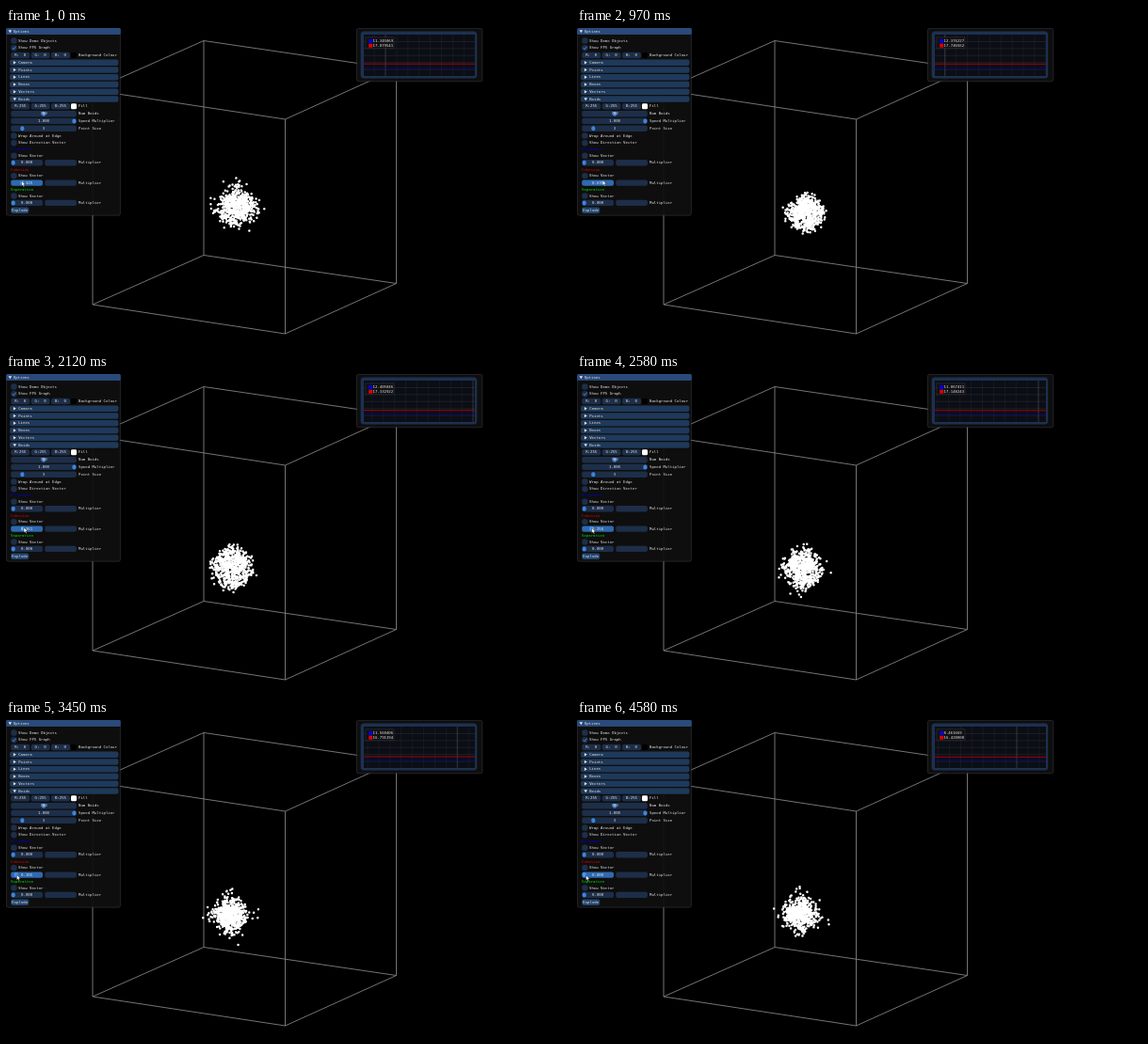
Animation of 600x338 px, one loop 4610 ms. Source, as an HTML page with a canvas:

```html
<!DOCTYPE html>
<html lang="en">
<head>
<meta charset="utf-8">
<title>Boids</title>
<style>
  html, body { margin: 0; width: 100%; height: 100%; overflow: hidden; background: #000; }
  canvas { display: block; width: 600px; height: 338px; }
</style>
</head>
<body>
<canvas id="stage" width="600" height="338"></canvas>
<script>
const ctx = document.getElementById('stage').getContext('2d');
const LOOP = 4610;
const BOIDS = 640;

const C = {
  win: 'rgba(15,15,15,.94)', border: 'rgba(110,110,128,.4)', title: '#294a7a',
  frame: '#1d2e49', header: '#1f395a', button: '#23456d', active: '#2f6ab0',
  grab: '#3d85e0', grabOn: '#4296fa', text: '#e6e6e6', edge: '#828282'
};

// Keyed values, one entry per time in `times`.
const times = [0, 550, 1360, 2120, 2970, 3910, 4580];
const keys = {
  cx:     [245, 242.5, 243, 240.5, 239, 237, 237],
  cy:     [190.5, 193.5, 201, 206.5, 208, 207, 206.5],
  spread: [9, 6.5, 9.2, 8.8, 8.7, 7.8, 8.3],
  flat:   [.2, .2, .85, .6, .15, 0, 0],
  mx:     [16.5, 25.5, 26.5, 19, 13.5, 10, 9.5],
  my:     [162.5, 161.5, 162, 163, 164, 165, 165],
  value:  [.324, .62, .65, .361, .188, .04, 0],
  low:    [11.343063, 12.444778, 12.19556, 12.406331, 11.418835, 11.40524, 8.461669],
  high:   [17.879662, 17.813324, 17.656666, 17.333334, 16.993334, 16.610001, 16.42],
  tick:   [403, 396, 386, 377, 366, 355, 348]
};

// Smooth curve through the keyed values.
function at(name, t) {
  const v = keys[name], last = times.length - 1;
  if (t >= times[last]) return v[last];
  let i = 0;
  while (t >= times[i + 1]) i++;
  const slope = k => {
    const a = Math.max(k - 1, 0), b = Math.min(k + 1, last);
    return (v[b] - v[a]) / (times[b] - times[a]);
  };
  const d = times[i + 1] - times[i], s = (t - times[i]) / d, r = 1 - s;
  return v[i] * (1 + 2 * s) * r * r + slope(i) * d * s * r * r +
         v[i + 1] * s * s * (3 - 2 * s) - slope(i + 1) * d * s * s * r;
}

function seeded(seed) {
  return () => (seed = seed * 16807 % 2147483647) / 2147483647;
}

const rand = seeded(4271);
const boids = Array.from({ length: BOIDS }, (_, i) => ({
  rank: (i + .5) / BOIDS, angle: rand() * Math.PI * 2, spin: (rand() - .5) * 1.8
}));
const noise = k => {
  const s = Math.sin(k * 12.9898) * 43758.5453;
  return s - Math.floor(s) - .5;
};

function box(x, y, w, h, fill, r = 2) {
  ctx.beginPath();
  ctx.roundRect(x, y, w, h, r);
  ctx.fillStyle = fill;
  ctx.fill();
}

function line(points, color, width = 1) {
  ctx.beginPath();
  points.forEach(([x, y]) => ctx.lineTo(x, y));
  ctx.strokeStyle = color;
  ctx.lineWidth = width;
  ctx.stroke();
}

// Drawn large and scaled down so glyph spacing stays fractional.
function text(str, x, y, color = C.text, align = 'left') {
  ctx.save();
  ctx.translate(x, y + .1);
  ctx.scale(.1, .1);
  ctx.font = '40px "DejaVu Sans Mono", monospace';
  ctx.textAlign = align;
  ctx.textBaseline = 'middle';
  ctx.fillStyle = color;
  ctx.fillText(str, 0, 0);
  ctx.restore();
}

function arrow(x, y, open) {
  ctx.beginPath();
  if (open) { ctx.moveTo(x - 1.8, y - 1.3); ctx.lineTo(x + 1.8, y - 1.3); ctx.lineTo(x, y + 1.6); }
  else { ctx.moveTo(x - 1.3, y - 1.8); ctx.lineTo(x + 1.6, y); ctx.lineTo(x - 1.3, y + 1.8); }
  ctx.fillStyle = C.text;
  ctx.fill();
}

function panel(x, y, w, h) {
  box(x, y, w, h, C.win);
  ctx.strokeStyle = C.border;
  ctx.lineWidth = .7;
  ctx.stroke();
}

function check(y, label, on) {
  box(5.2, y - 3.2, 6.4, 6.4, C.frame, 2.8);
  if (on) line([[6.7, y], [8, y + 1.5], [10.4, y - 1.5]], C.grabOn, .9);
  text(label, 13, y);
}

function header(y, label, open) {
  box(4, y - 3.2, 115.4, 6.4, C.header);
  arrow(9.2, y, open);
  text(label, 13.2, y);
}

function slider(y, w, value, grabX, label, on) {
  box(5.2, y - 3.2, w, 6.4, on ? C.active : C.frame);
  box(grabX - 2, y - 2.5, 4, 5, on ? C.grabOn : C.grab);
  text(value, 5.2 + w / 2, y, C.text, 'center');
  if (label) text(label, 77, y);
}

function color(y, value, swatch, label) {
  ['R', 'G', 'B'].forEach((c, i) => {
    box(5.2 + i * 21.4, y - 3.2, 20, 6.4, C.frame);
    text(c + ':' + value, 15.2 + i * 21.4, y, C.text, 'center');
  });
  box(69, y - 3, 6, 6, swatch, 1.4);
  text(label, 77, y);
}

function rule(y, name, tint, value, on) {
  text(name, 5, y, tint);
  check(y + 6.7, 'Show Vector');
  slider(y + 14.2, 33.8, value.toFixed(3), 7.7 + value * 29, '', on);
  box(41.3, y + 11, 33.6, 6.4, C.frame);
  text('Multiplier', 77, y + 14.2);
}

function options(t) {
  panel(.4, .4, 121, 198.8);
  box(0, 0, 121.8, 7, C.title, 1.5);
  arrow(4.3, 3.6, true);
  text('Options', 7.8, 3.5);
  ctx.save();
  ctx.translate(0, .3);
  check(13.2, 'Show Demo Objects');
  check(20.9, 'Show FPS Graph', true);
  color(28.7, '  0', '#000', 'Background Colour');
  ['Camera', 'Points', 'Lines', 'Boxes', 'Vectors', 'Boids']
    .forEach((name, i) => header(36.5 + i * 7.75, name, i === 5));
  color(83, '255', '#fff', 'Fill');
  slider(90.9, 69.6, '700', 40, 'Num Boids');
  slider(98.6, 69.6, '1.000', 72.4, 'Speed Multiplier');
  slider(106.4, 69.6, '3', 17.3, 'Point Size');
  check(114.2, 'Wrap Around at Edge');
  check(121.9, 'Show Direction Vector');
  rule(128.8, 'Alignment', '#0000d0', 0);
  rule(150.1, 'Cohesion', '#e00000', Math.max(0, at('value', t)), true);
  rule(171.4, 'Separation', '#00e000', 0);
  box(5.2, 190.3, 19, 6.4, C.button);
  text('Explode', 14.7, 193.5, C.text, 'center');
  ctx.restore();
}

function graph(t) {
  const x0 = 380, x1 = 498, y0 = 7, y1 = 51;
  const low = at('low', t), high = at('high', t);
  const scroll = at('tick', t);
  const toY = v => y1 + .5 - v * .74;

  panel(372.4, .4, 133.4, 56.4);
  box(376.6, 3.4, 123.6, 50, '#1d3050', 3.5);
  box(x0, y0, x1 - x0, y1 - y0, '#0b0e14', 0);

  ctx.save();
  ctx.beginPath();
  ctx.rect(x0, y0, x1 - x0, y1 - y0);
  ctx.clip();
  for (let i = -10; i < 22; i++) {
    const x = scroll + i * 11.9;
    const major = i % 10 === 0;
    line([[x, y0], [x, y1]], major ? 'rgba(255,255,255,.22)' : 'rgba(255,255,255,.06)', .8);
  }
  for (let v = 10; v < 60; v += 10)
    line([[x0, toY(v)], [x1, toY(v)]], 'rgba(255,255,255,.09)', .7);

  const trace = [];
  const step = 1.2, first = Math.floor((x0 - scroll) / step);
  for (let k = first; scroll + k * step < x1 + 2; k++)
    trace.push([scroll + k * step, toY(11.9 + noise(k) * 1.2)]);
  line(trace, '#0000b4', .7);
  line([[x0, toY(high + .1)], [x1, toY(high)]], '#b40000', .9);
  ctx.restore();

  box(381.8, 9.8, 30.2, 11.8, 'rgba(18,18,20,.92)', 0);
  ctx.strokeStyle = C.border;
  ctx.lineWidth = .5;
  ctx.stroke();
  box(385.2, 12, 4, 4, '#0000e0', 0);
  box(385.2, 16.7, 4, 4, '#e00000', 0);
  text(low.toFixed(6), 389.5, 14.2);
  text(high.toFixed(6), 389.5, 18.8);
}

function cube() {
  const top = [[210, 13.5], [414.5, 43.5], [296.5, 97], [92, 66]];
  const low = top.map(([x, y]) => [x, y + 228]);
  [top, low].forEach(face => line([...face, face[0]], C.edge, .9));
  top.forEach((p, i) => line([p, low[i]], C.edge, .9));
}

// Radii blend between a bell-shaped cloud and an even disc.
function flock(t) {
  const cx = at('cx', t), cy = at('cy', t), spread = at('spread', t);
  const flat = Math.max(0, at('flat', t));
  ctx.fillStyle = '#fff';
  ctx.beginPath();
  for (const b of boids) {
    const bell = Math.sqrt(-2 * Math.log(1 - b.rank));
    const disc = 2.6 * Math.sqrt(b.rank);
    const a = b.angle + b.spin * t / 1000;
    const star = 1 + .14 * (1 - flat) * Math.cos(4 * a);
    const r = spread * star * (bell + (disc - bell) * flat);
    const x = cx + r * Math.cos(a), y = cy + r * Math.sin(a);
    ctx.moveTo(x + 1.25, y);
    ctx.arc(x, y, 1.25, 0, Math.PI * 2);
  }
  ctx.fill();
}

function pointer(t) {
  ctx.save();
  ctx.translate(at('mx', t), at('my', t));
  ctx.beginPath();
  [[0, 0], [0, 5.6], [1.3, 4.5], [2.2, 6.5], [3.1, 6.1], [2.2, 4.1], [4, 4]]
    .forEach(([x, y]) => ctx.lineTo(x, y));
  ctx.closePath();
  ctx.fillStyle = '#fff';
  ctx.strokeStyle = '#000';
  ctx.lineWidth = .4;
  ctx.fill();
  ctx.stroke();
  ctx.restore();
}

function draw(now) {
  const t = now % LOOP;
  ctx.fillStyle = '#000';
  ctx.fillRect(0, 0, 600, 338);
  cube();
  flock(t);
  options(t);
  graph(t);
  pointer(t);
}

const start = performance.now();
function tick() {
  draw(performance.now() - start);
  requestAnimationFrame(tick);
}
tick();
</script>
</body>
</html>
```
